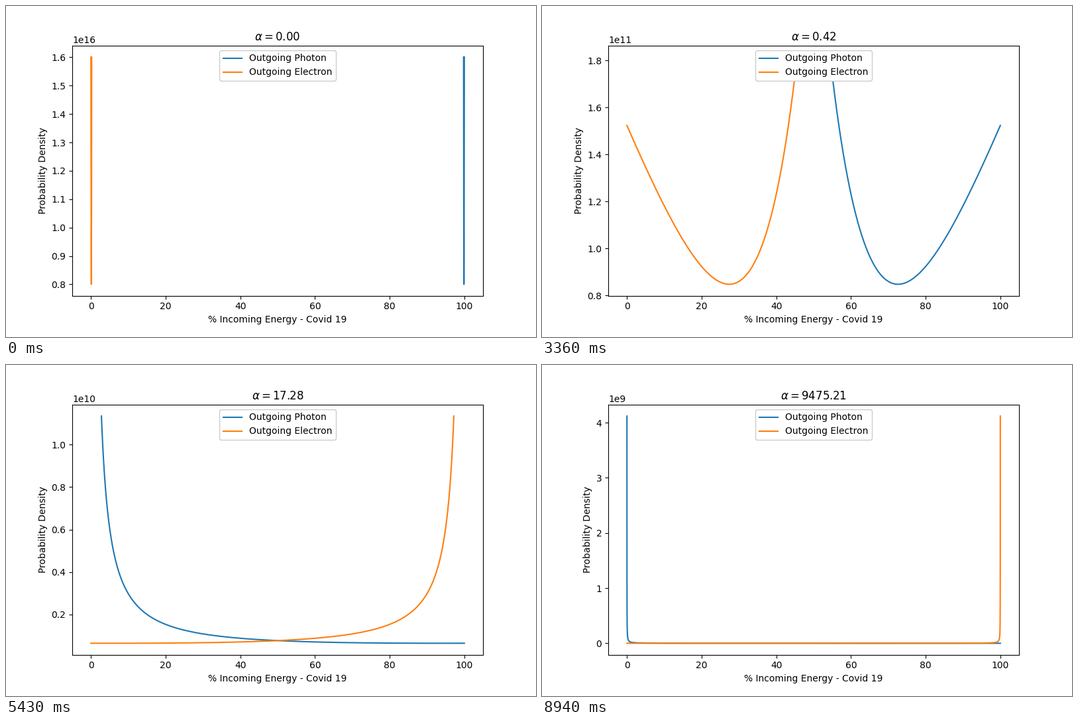
These frames come from a looping animation (800 by 500 pixels, 8.97 s). A matplotlib script:

```python
import numpy as np
import matplotlib.pyplot as plt
from matplotlib.animation import FuncAnimation

REST_ENERGY = 9.1094e-31 * 3e8 ** 2  # electron, in joules
FRAMES = 299

alphas = np.logspace(-3, 4, FRAMES + 1)
theta = np.linspace(0, np.pi, 1800)
sin = np.sin(theta)


def klein_nishina(alpha):
    """Outgoing photon energy fraction and its probability density."""
    ratio = 1 / (1 + alpha * (1 - np.cos(theta)))
    weight = ratio ** 2 * (ratio + 1 / ratio - sin ** 2)
    total = np.sum(weight * sin)
    slope = alpha * REST_ENERGY * alpha * ratio ** 2  # dE/dtheta without sin
    return ratio, weight / total / slope


fig, ax = plt.subplots(figsize=(8, 5), dpi=100)
fig.subplots_adjust(left=0.125, right=0.9, bottom=0.125, top=0.88)
photon, = ax.plot([], [], label="Outgoing Photon")
electron, = ax.plot([], [], label="Outgoing Electron")
ax.set_xlabel("% Incoming Energy - Covid 19")
ax.set_ylabel("Probability Density")
ax.legend(loc="upper center", framealpha=1)
title = ax.set_title("")


def update(i):
    ratio, density = klein_nishina(alphas[i])
    photon.set_data(100 * ratio, density)
    electron.set_data(100 * (1 - ratio), density)
    ax.relim()
    ax.autoscale_view()
    title.set_text(rf"$\alpha = {alphas[i]:.2f}$")
    return photon, electron, title


anim = FuncAnimation(fig, update, frames=FRAMES, interval=30,
                     repeat=True, repeat_delay=0, blit=False)
plt.show()
```
